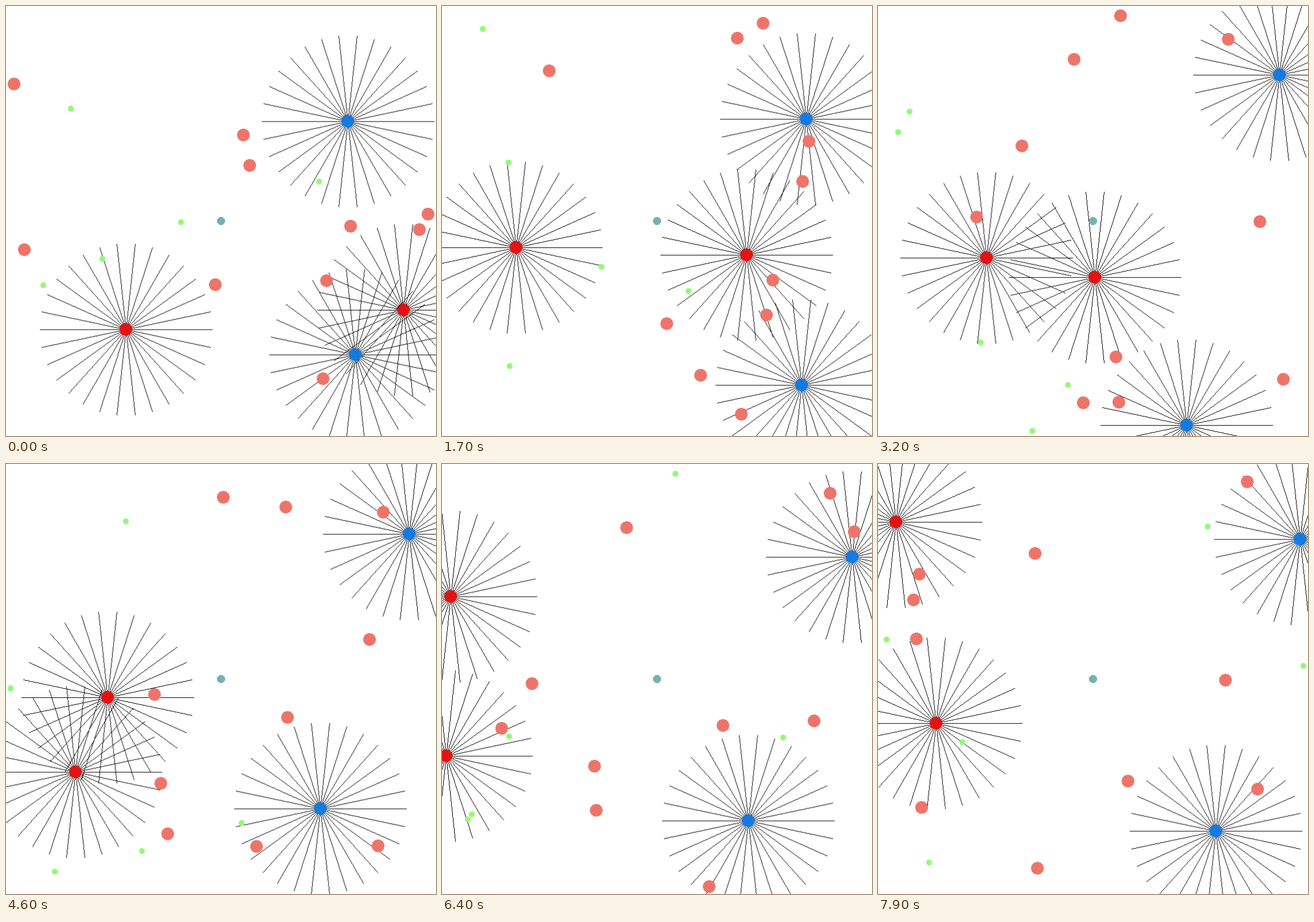
These frames come from a looping animation (748 by 748 pixels, 8000 ms). An HTML page with a canvas:

```html
<!DOCTYPE html>
<html lang="en">
<head>
<meta charset="utf-8">
<title>Water world</title>
<style>
  html, body { margin: 0; width: 100%; height: 100%; overflow: hidden; background: #fff; }
  canvas { display: block; width: 748px; height: 748px; }
</style>
</head>
<body>
<canvas id="stage" width="748" height="748"></canvas>
<script>
const LOOP = 8000, FRAME = 100, STEP = 40;
const WORLD = 750, MID = WORLD / 2;
const RAYS = 30, REACH = 150, ROCK = 75;
const RED = '#e11414', BLUE = '#147ae1';

const stage = document.getElementById('stage').getContext('2d');
const buffer = document.createElement('canvas');
buffer.width = buffer.height = WORLD;
const ctx = buffer.getContext('2d');

// A drifter coasts and rebounds; if eaten it starts a new life elsewhere.
// Life: birth step, x, y, vx, vy
const food = [
  [[0, 305, 377, -4.4, -2.41]],
  [[0, 65, 486.5, -4.07, 3.3]],
  [[0, 545.5, 306, -2.68, 4.44]],
  [[0, 113, 178.5, -0.98, -4.88]],
  [[0, 167.5, 441, 4.39, -0.78]]
];
const poison = [
  [[0, 721, 390, -1.88, -3.57], [78, 425.6, 14.7, -1.26, 1.18]],
  [[0, 600.5, 384, -1, 2.5], [20, 529, 13, 1.36, 0.75], [180, 90, 156, -1, 2]],
  [[0, 558.5, 478.5, -2.51, 3.86]],
  [[0, 736, 363, -3.95, 4.1]],
  [[0, 425, 278, 3.53, 4.66]],
  [[0, 32, 425, 1, -0.5], [25, 551, 38, -2, 1], [60, 152, 338, 1, 1.5], [90, 625, 228, 0.34, 3.14]],
  [[0, 414, 224.5, 5, 1.89]],
  [[0, 553, 650, -0.72, 1.44], [60, 246, 154, 0.23, 4.5]],
  [[0, 365, 486, 0.63, 1.57], [180, 418, 579.5, 1, -1.5]],
  [[0, 14, 135.5, -4.19, -0.53]]
];

// Hunters ease through a few points, reached at these steps.
const knots = [0, 43, 80, 115, 143, 160, 198];
const hunters = [
  { color: RED, x: [209, 129, 189, 121, 84, 7, 101], y: [564, 421, 439, 537, 531, 509, 452] },
  { color: RED, x: [693, 531, 378, 177, 77, 15, 31], y: [530, 434, 473, 407, 258, 231, 101] },
  { color: BLUE, x: [596, 635, 700, 703, 742, 715, 736], y: [201, 197, 120, 122, 229, 162, 131] },
  { color: BLUE, x: [609, 627, 538, 548, 501, 534, 589], y: [608, 661, 731, 601, 680, 622, 640] }
];

function wall(p, v, gap) {
  const far = WORLD - gap;
  if (p < gap && v < 0) return [2 * gap - p, -v];
  if (p > far && v > 0) return [2 * far - p, -v];
  return [p, v];
}

function drift(lives, k, r) {
  let [born, x, y, vx, vy] = lives.filter(life => life[0] <= k).pop();
  for (let i = born; i < k; i++) {
    [x, vx] = wall(x + vx, vx, r - 0.8);
    [y, vy] = wall(y + vy, vy, r - 0.8);
    // Elastic rebound from the rock in the middle
    const dx = x - MID, dy = y - MID, d2 = dx * dx + dy * dy;
    const toward = dx * vx + dy * vy;
    if (d2 < (ROCK + r) ** 2 && toward < 0) {
      vx -= 2 * toward * dx / d2;
      vy -= 2 * toward * dy / d2;
    }
  }
  return [x, y];
}

function slope(p, i) {
  const a = Math.max(i - 1, 0), b = Math.min(i + 1, knots.length - 1);
  return (p[b] - p[a]) / (knots[b] - knots[a]);
}

function glide(p, k) {
  let i = 0;
  while (i < knots.length - 2 && k >= knots[i + 1]) i++;
  const h = knots[i + 1] - knots[i], t = (k - knots[i]) / h, u = 1 - t;
  const v = p[i] * u * u * (1 + 2 * t) + p[i + 1] * t * t * (3 - 2 * t)
    + h * t * u * (slope(p, i) * u - slope(p, i + 1) * t);
  return Math.round(Math.min(WORLD - 7, Math.max(7, v)));
}

// Hard-edged drawing, without smoothing
function disc(x, y, r, color) {
  x = Math.round(x);
  y = Math.round(y);
  ctx.fillStyle = color;
  for (let d = -r; d < r; d++) {
    const w = Math.round(Math.sqrt(r * r - (d + 0.5) ** 2));
    ctx.fillRect(x - w, y + d, 2 * w, 1);
  }
}

function line(x, y, dx, dy) {
  const n = Math.max(Math.abs(dx), Math.abs(dy));
  for (let i = 0; i <= n; i++) {
    ctx.fillRect(x + Math.round(dx * i / n), y + Math.round(dy * i / n), 1, 1);
  }
}

function hunter({ color, x, y }, k) {
  const cx = glide(x, k), cy = glide(y, k);
  ctx.fillStyle = '#000';
  for (let i = 0; i < RAYS; i++) {
    const a = 2 * Math.PI * i / RAYS;
    line(cx, cy, Math.round(REACH * Math.cos(a)), Math.round(REACH * Math.sin(a)));
  }
  disc(cx, cy, 11, color);
}

function draw(frame) {
  const k = Math.round(frame * FRAME / STEP);
  ctx.fillStyle = '#fff';
  ctx.fillRect(0, 0, WORLD, WORLD);
  hunters.forEach(h => hunter(h, k));
  disc(MID, MID, 7, '#78b0b2');
  food.forEach(f => disc(...drift(f, k, 5), 5, '#91fa74'));
  poison.forEach(p => disc(...drift(p, k, 11), 11, '#ee746a'));
  // The world is slightly larger than the stage, which softens some lines.
  stage.drawImage(buffer, 0, 0, stage.canvas.width, stage.canvas.height);
}

let shown = -1;
const start = performance.now();
function tick() {
  const t = Math.max(0, performance.now() - start) % LOOP;
  const frame = Math.floor(t / FRAME);
  if (frame !== shown) draw(shown = frame);
  requestAnimationFrame(tick);
}
tick();
</script>
</body>
</html>
```
